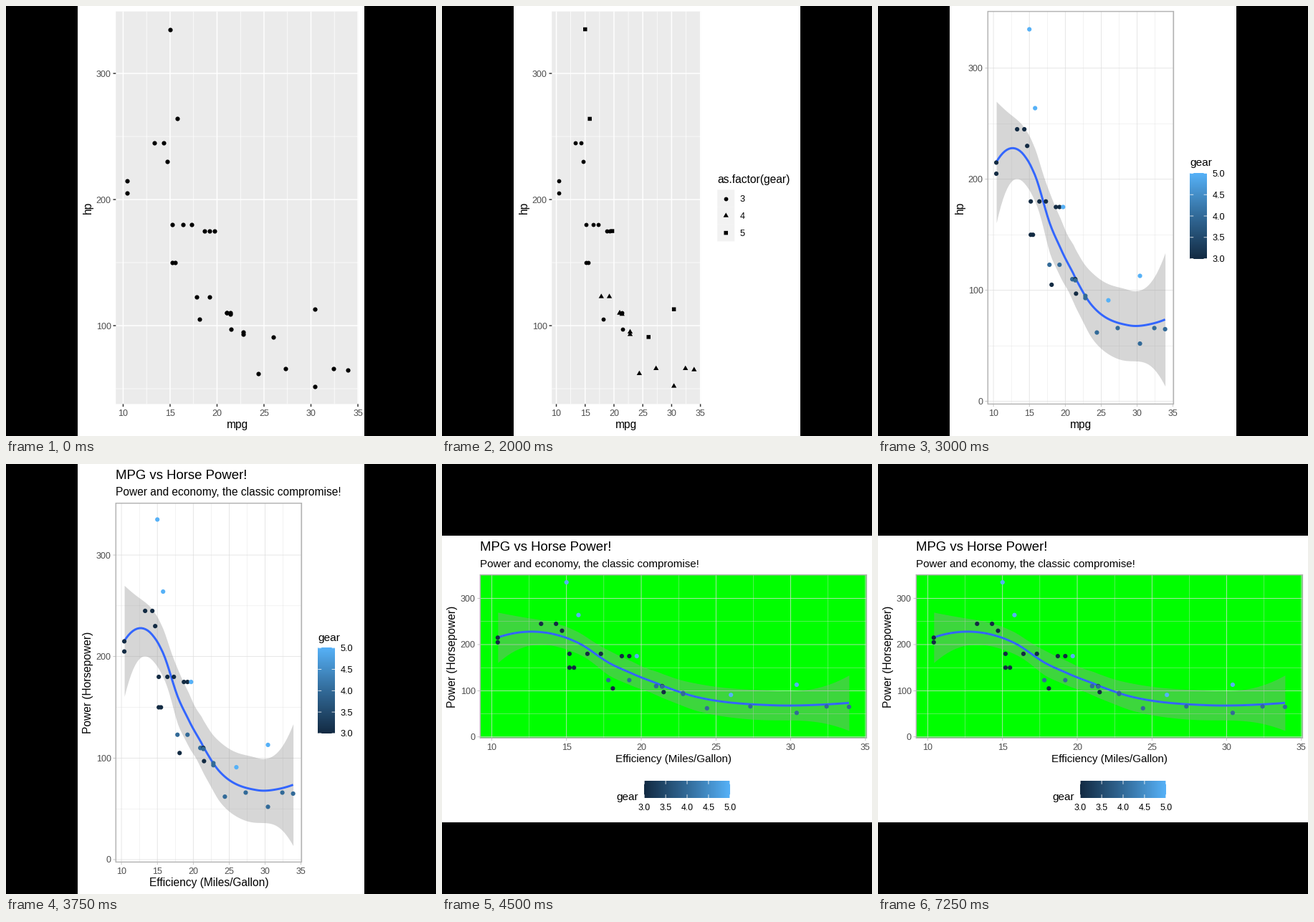
Recreate the animation shown at these times as a matplotlib script. Size 600 by 600 pixels, loop 7500 ms.

```python
import numpy as np
import matplotlib.pyplot as plt
from matplotlib.animation import FuncAnimation
from matplotlib.colors import LinearSegmentedColormap
from matplotlib.patches import Rectangle

plt.rcParams["font.family"] = "Liberation Sans"

SIZE, DPI = 600, 100
PT = 72 / DPI

# mtcars: mpg, hp, gear
CARS = np.array([
    (21.0, 110, 4), (21.0, 110, 4), (22.8, 93, 4), (21.4, 110, 3),
    (18.7, 175, 3), (18.1, 105, 3), (14.3, 245, 3), (24.4, 62, 4),
    (22.8, 95, 4), (19.2, 123, 4), (17.8, 123, 4), (16.4, 180, 3),
    (17.3, 180, 3), (15.2, 180, 3), (10.4, 205, 3), (10.4, 215, 3),
    (14.7, 230, 3), (32.4, 66, 4), (30.4, 52, 4), (33.9, 65, 4),
    (21.5, 97, 3), (15.5, 150, 3), (15.2, 150, 3), (13.3, 245, 3),
    (19.2, 175, 3), (27.3, 66, 4), (26.0, 91, 5), (30.4, 113, 5),
    (15.8, 264, 5), (19.7, 175, 5), (15.0, 335, 5), (21.4, 109, 4)])
MPG, HP, GEAR = CARS.T
BLUES = LinearSegmentedColormap.from_list(
    "blues", ["#132B43", "#326A98", "#56B1F7"])


def cuts(v, cell=4):
    """Split points of the loess k-d tree over sorted values."""
    n = len(v)
    if n <= cell:
        return []
    mid = (n + 1) // 2
    for k in sorted(range(1, n), key=lambda k: (abs(k - mid), -k)):
        if v[k - 1] != v[k]:
            return (cuts(v[:k]) + [(v[k - 1] + v[k]) / 2] + cuts(v[k:]))
    return []


def local_rows(x0, x, q):
    """Weights giving value and slope of a local quadratic at x0."""
    d = np.abs(x - x0)
    w = np.clip(1 - (d / np.sort(d)[q - 1]) ** 3, 0, None) ** 3
    root = np.sqrt(w)
    basis = np.vander(x - x0, 3, increasing=True)
    return (np.linalg.pinv(basis * root[:, None]) * root)[:2]


def loess(x, y, at, span=0.75):
    margin = 0.1 * np.ptp(x)
    knots = np.array([x.min() - margin, *cuts(np.sort(x)), x.max() + margin])
    rows = np.array([local_rows(k, x, int(span * len(x))) for k in knots])

    def operator(p):
        i = np.clip(np.searchsorted(knots, p) - 1, 0, len(knots) - 2)
        h = (knots[i + 1] - knots[i])[:, None]
        t = (p - knots[i])[:, None] / h
        a, b = rows[i], rows[i + 1]
        return ((1 + 2 * t) * (1 - t) ** 2 * a[:, 0]
                + t * (1 - t) ** 2 * h * a[:, 1]
                + t * t * (3 - 2 * t) * b[:, 0]
                - t * t * (1 - t) * h * b[:, 1])

    resid = np.eye(len(x)) - operator(x)
    m = resid @ resid.T
    d1, d2 = np.trace(m), np.trace(m @ m)
    df = d1 ** 2 / d2
    tq = 1.96 + 2.372 / df + 2.82 / df ** 2
    op = operator(at)
    s = np.sqrt(np.sum((resid @ y) ** 2) / d1)
    return op @ y, tq * s * np.linalg.norm(op, axis=1)


FIT_X = np.linspace(MPG.min(), MPG.max(), 80)
FIT, BAND = loess(MPG, HP, FIT_X)

fig = plt.figure(figsize=(SIZE / DPI, SIZE / DPI), dpi=DPI, facecolor="black")
ax = fig.add_axes([0, 0, 1, 1])


def box(x0, y0, x1, y1, z, fill="none", edge="none", lw=0):
    ax.add_patch(Rectangle((x0, y0), x1 - x0, y1 - y0, facecolor=fill,
                           edgecolor=edge, lw=lw * PT, zorder=z, snap=False))


def line(xs, ys, color, width, z):
    ax.plot(xs, ys, color=color, lw=width * PT, zorder=z, snap=False,
            solid_capstyle="butt")


def text(x, y, s, px, ha="left", color="black", rot=0):
    ax.text(x, y, s, fontsize=px * PT, ha=ha, va="baseline", color=color,
            rotation=rot, rotation_mode="anchor", zorder=9)


def mark(x, y, gear, color="black"):
    if gear == 4:
        ax.fill([x, x + 3.65, x - 3.65], [y - 4.2, y + 2.1, y + 2.1],
                color=color, lw=0, zorder=6)
    elif gear == 5:
        box(x - 2.75, y - 2.75, x + 2.75, y + 2.75, 6, color)
    else:
        dots([x], [y], color, 2.9)


def dots(x, y, color, r=3.1):
    ax.scatter(x, y, s=(2 * r * PT) ** 2, c=color, linewidths=0, zorder=6)


def gradient(x0, y0, x1, y1, horizontal):
    ramp = np.linspace(0, 1, 120)
    data = ramp[None, :] if horizontal else ramp[::-1, None]
    ax.imshow(BLUES(data), extent=(x0, x1, y1, y0), aspect="auto", zorder=5)


def bar_right(x, top):
    text(x, top - 9.5, "gear", 15.4)
    gradient(x, top, x + 24, top + 120, False)
    for k in range(5):
        y = top + 0.4 + 29.8 * k
        line([x, x + 4.8], [y, y], "white", 0.8, 6)
        line([x + 19.2, x + 24], [y, y], "white", 0.8, 6)
        text(x + 31.2, y + 4.5, f"{5 - k / 2:.1f}", 12.6)


def bar_bottom(x, top):
    text(x - 38.5, top + 26.5, "gear", 15.2)
    gradient(x, top, x + 120, top + 24, True)
    for k in range(5):
        tx = x + 0.2 + 29.9 * k
        line([tx, tx], [top, top + 4.8], "white", 0.8, 6)
        line([tx, tx], [top + 19.2, top + 24], "white", 0.8, 6)
        text(tx, top + 41, f"{3 + k / 2:.1f}", 12.4, "center")


def keys(x, top):
    text(x, top - 9.3, "as.factor(gear)", 15.6)
    for k, gear in enumerate((3, 4, 5)):
        y = top + 24 * k
        box(x, y, x + 24, y + 24, 2, "#F2F2F2")
        mark(x + 12, y + 12.2, gear)
        text(x + 31.4, y + 16.8, str(gear), 12.6)


def plot(right, legend=None, smooth=False, light=False, labs=False,
         wide=False, fill=None):
    left = 53.3 if wide else 153.3
    page = 100 if wide else 0
    top = page + (54.7 if labs else 7.6)
    bottom = 382.3 if legend == "bottom" else (455.4 if wide else 555.4)
    em = 15.15 if wide else 15.5

    low = (FIT - BAND).min() if smooth else HP.min()
    pad_x, pad_y = 0.05 * np.ptp(MPG), 0.05 * (HP.max() - low)
    x_lo, x_hi = MPG.min() - pad_x, MPG.max() + pad_x
    y_lo, y_hi = low - pad_y, HP.max() + pad_y

    def px(v):
        return left + (v - x_lo) / (x_hi - x_lo) * (right - left)

    def py(v):
        return bottom - (v - y_lo) / (y_hi - y_lo) * (bottom - top)

    if wide:
        box(0, 100, 600, 500, 0, "white")
    else:
        box(100, 0, 500, 600, 0, "white")
    box(left, top, right, bottom, 1, fill or ("white" if light else "#EBEBEB"))

    grid = "#DEDEDE" if light else "white"
    tick = "#B3B3B3" if light else "#333333"
    thick = 0.74 if light else 1.48
    for v in np.arange(10, 35.1, 2.5):
        major = v % 5 == 0
        line([px(v)] * 2, [top, bottom], grid, thick if major else thick / 2,
             3 if major else 2)
        if major:
            line([px(v)] * 2, [bottom, bottom + 3.8], tick, thick, 3)
            text(px(v), bottom + 16.6, f"{v:.0f}", 12.5, "center", "#4D4D4D")
    for v in range(0, 301, 50):
        if v < y_lo:
            continue
        major = v % 100 == 0
        line([left, right], [py(v)] * 2, grid, thick if major else thick / 2,
             3 if major else 2)
        if major:
            line([left - 3.8, left], [py(v)] * 2, tick, thick, 3)
            text(left - 6.7, py(v) + 4.5, str(v), 12.5, "right", "#4D4D4D")

    if smooth:
        ax.fill_between(px(FIT_X), py(FIT - BAND), py(FIT + BAND),
                        color="#999999", alpha=0.4, lw=0, zorder=4)
        line(px(FIT_X), py(FIT), "#3366FF", 2.96, 5)
    if legend == "keys":
        for mpg, hp, gear in CARS:
            mark(px(mpg), py(hp), gear)
    else:
        dots(px(MPG), py(HP), BLUES((GEAR - 3) / 2) if legend else "black")
    if light:
        box(left, top, right, bottom, 8, edge="#B3B3B3", lw=1.48)

    text((left + right) / 2, bottom + 33.6,
         "Efficiency (Miles/Gallon)" if labs else "mpg", em, "center")
    text(left - 34.3, (top + bottom) / 2,
         "Power (Horsepower)" if labs else "hp", 15.5, "center", rot=90)
    if labs:
        text(left - 0.6, page + 21.3, "MPG vs Horse Power!", 18.6)
        text(left - 0.6, page + 44,
             "Power and economy, the classic compromise!", em)

    if legend == "keys":
        keys(right + 23, 256.4)
    elif legend == "bar":
        bar_right(right + 23, 256.3 if labs else 233)
    elif legend == "bottom":
        bar_bottom(282, 442)


# (first frame, options): the chart gains one layer per step
FITTED = dict(right=412.4, legend="bar", smooth=True)
LABELLED = dict(FITTED, light=True, labs=True)
WIDE = dict(LABELLED, wide=True, right=512.4)
BELOW = dict(WIDE, right=592.4, legend="bottom")
STEPS = [
    (0, dict(right=492.0)),
    (8, dict(right=361.2, legend="keys")),
    (9, dict(right=412.4, legend="bar")),
    (10, FITTED),
    (12, dict(FITTED, light=True)),
    (13, LABELLED),
    (16, WIDE),
    (17, BELOW),
    (18, dict(BELOW, fill="#00FF00")),
]


def draw(frame):
    ax.clear()
    ax.set_axis_off()
    plot(**[opts for start, opts in STEPS if start <= frame][-1])
    ax.set_xlim(0, SIZE)
    ax.set_ylim(SIZE, 0)
    return []


anim = FuncAnimation(fig, draw, frames=30, interval=250,
                     init_func=lambda: draw(0), repeat=True, repeat_delay=0)
plt.show()
```
